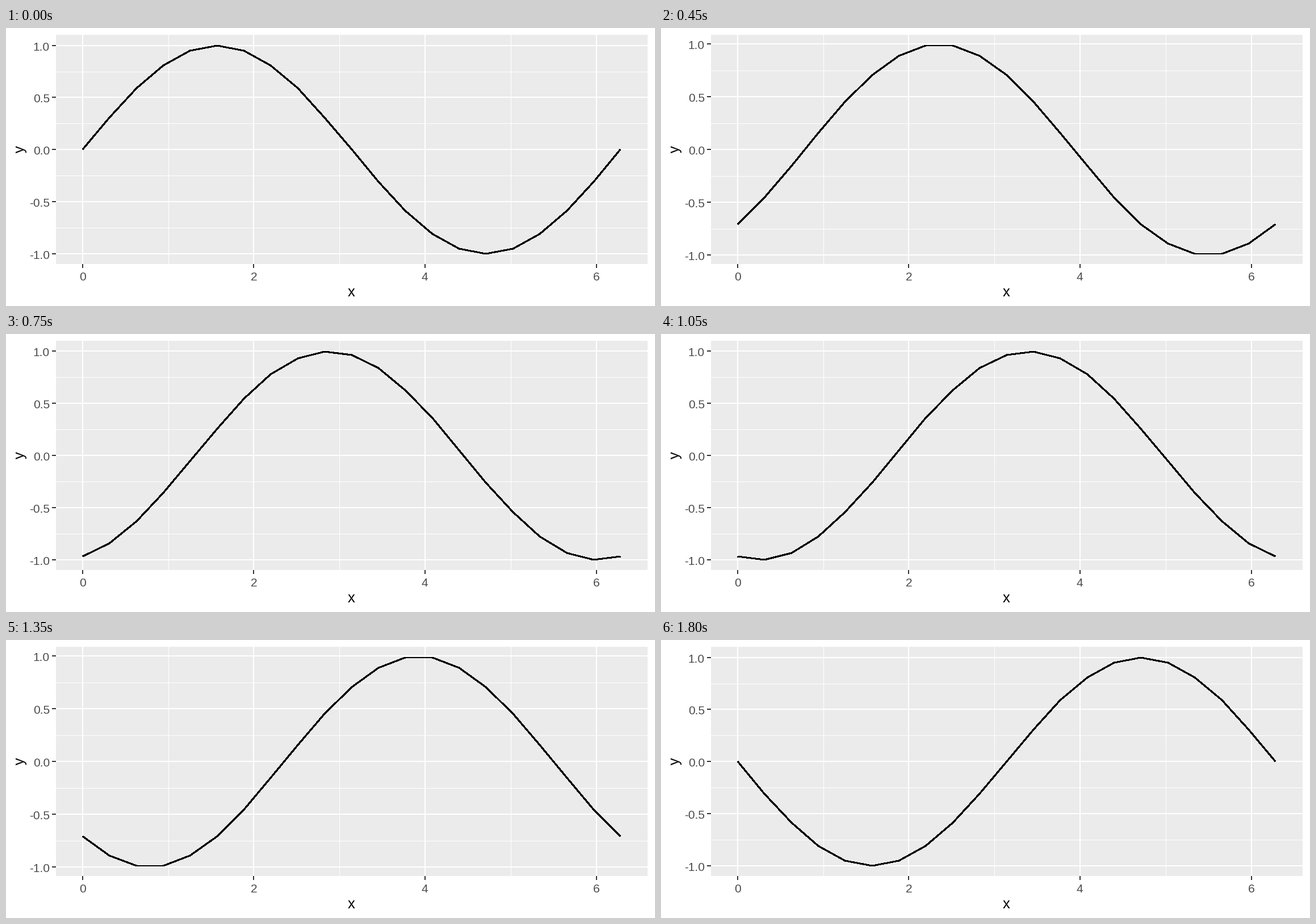
A matplotlib script that plays this animation: 1143 px wide and 490 px high, repeating every 1.95 s.

```python
import numpy as np
import matplotlib.pyplot as plt
from matplotlib.animation import FuncAnimation
from matplotlib.patches import Rectangle

plt.rcParams["font.family"] = "Liberation Sans"

W, H, DPI = 1143, 490, 64
PX = 72 / DPI  # points per pixel
LEFT, RIGHT, TOP, BOTTOM = 88.0, 1130.2, 12.78, 416.8
FRAMES, INTERVAL = 13, 150
LABEL_EM, TITLE_EM = 21, 25.67
EM_WIDTH = {"-": 0.333, ".": 0.278}
GREY, TICK, TEXT = "#EBEBEB", "#333333", "#4D4D4D"

xs = np.linspace(0, 2 * np.pi, 21)
x_pad = 0.05 * 2 * np.pi

fig = plt.figure(figsize=(W / DPI, H / DPI), dpi=DPI, facecolor="white")
ax = fig.add_axes([0, 0, 1, 1])
ax.set_xlim(0, W)
ax.set_ylim(H, 0)  # data units are pixels, y downwards
ax.axis("off")


def x_pixel(x):
    return LEFT + (x + x_pad) / (2 * np.pi + 2 * x_pad) * (RIGHT - LEFT)


def y_pixel(y, reach):
    return TOP + (reach - y) / (2 * reach) * (BOTTOM - TOP)


def bar(x, y, w, h, color, z):
    return ax.add_patch(Rectangle((x, y), w, h, fc=color, lw=0,
                                  antialiased=False, zorder=z))


def label(x, y, s, em=LABEL_EM, color=TEXT, **kw):
    return ax.text(x, y, s, fontsize=em * PX, color=color,
                   ha="left", va="baseline", **kw)


def advance(s):
    return LABEL_EM * sum(EM_WIDTH.get(c, 0.556) for c in s)


x0, x1, y0, y1 = (int(v) for v in (LEFT, RIGHT, TOP, BOTTOM))
bar(x0, y0, x1 - x0, y1 - y0, GREY, 0)

for v in (1, 3, 5):
    bar(int(x_pixel(v)), y0, 1, y1 - y0, "white", 1)
for v in (0, 2, 4, 6):
    p = int(x_pixel(v))
    bar(p - 1, y0, 2, y1 - y0, "white", 2)
    bar(p - 1, y1, 2, 7, TICK, 3)
    label(int(x_pixel(v) - advance("0") / 2), 445, str(v))

minor = [(v, bar(x0, 0, x1 - x0, 1, "white", 1))
         for v in (-0.75, -0.25, 0.25, 0.75)]
major = []
for v in (-1, -0.5, 0, 0.5, 1):
    s = f"{v:.1f}"
    major.append((v, bar(x0, 0, x1 - x0, 2, "white", 2),
                  bar(81, 0, x0 - 81, 2, TICK, 3),
                  label(77 - advance(s), 0, s)))

label(602, 473, "x", TITLE_EM, "black")
label(32, 220, "y", TITLE_EM, "black", rotation=90, rotation_mode="anchor")

curve, = ax.plot([], [], color="black", lw=2 * PX, antialiased=False,
                 solid_capstyle="butt", solid_joinstyle="round",
                 snap=False, zorder=4)


def update(k):
    ys = np.sin(xs - k * np.pi / 12)
    reach = 1.1 * np.abs(ys).max()  # 5 % of the range on each side
    for v, line in minor:
        line.set_y(int(y_pixel(v, reach)))
    for v, line, tick, text in major:
        p = int(y_pixel(v, reach))
        line.set_y(p - 1)
        tick.set_y(p - 1)
        text.set_y(p + 9)
    curve.set_data(np.floor(x_pixel(xs)), np.floor(y_pixel(ys, reach)))
    return [curve]


anim = FuncAnimation(fig, update, frames=FRAMES, interval=INTERVAL,
                     init_func=lambda: update(0), repeat=True, repeat_delay=0)
plt.show()
```
